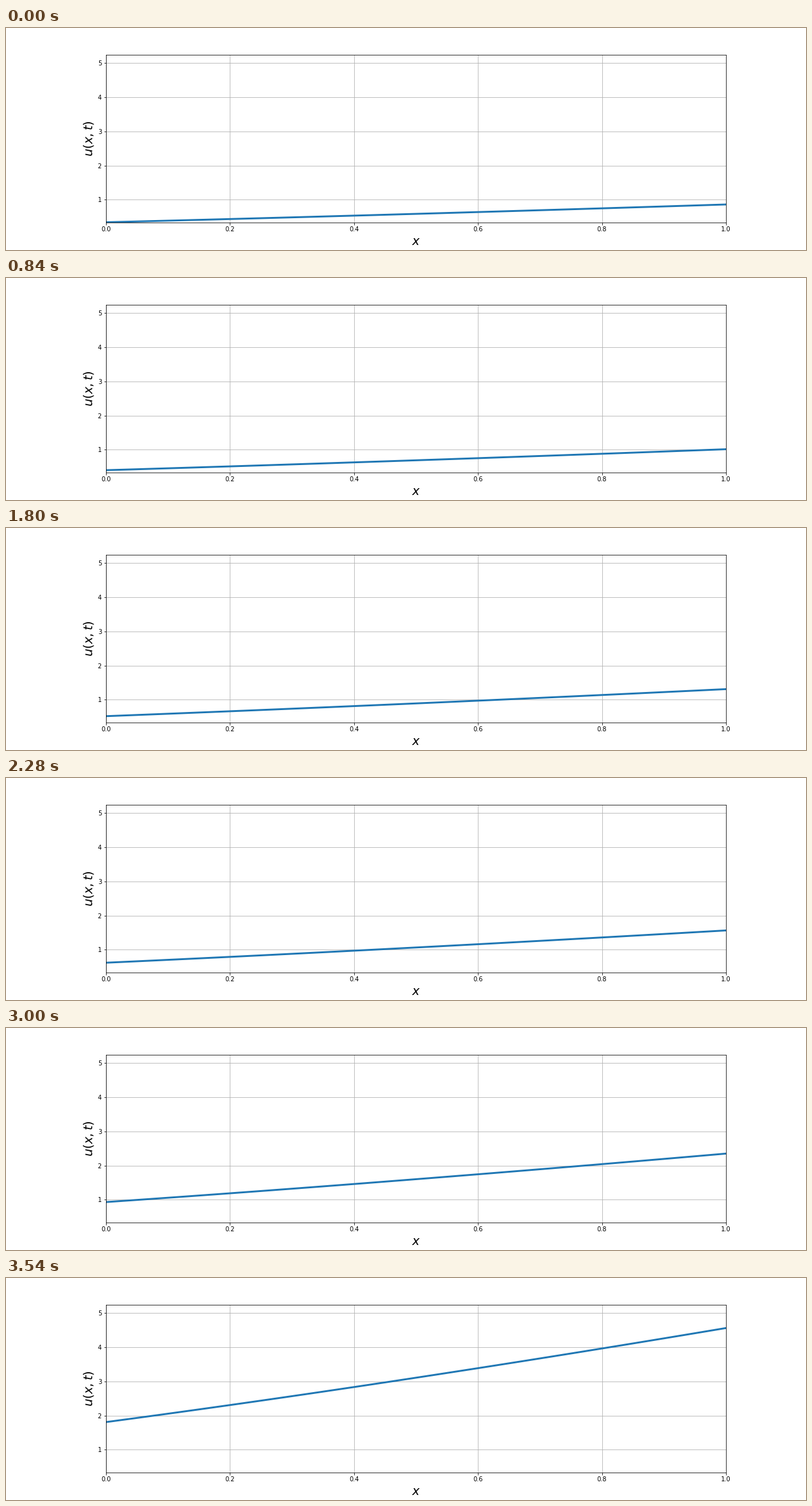
Animation, 1280 px wide and 356 px high, one loop 3600 ms. Source, as a matplotlib script:

```python
import numpy as np
import matplotlib.pyplot as plt
from matplotlib.animation import FuncAnimation

W, H, DPI = 1280, 356, 72
FRAMES, INTERVAL = 60, 60
SCALE = W / (18 * DPI)  # the layout is designed for an 18 inch wide figure

plt.rcParams.update({
    "font.family": "DejaVu Sans",
    "font.size": 10 * SCALE,
    "mathtext.fontset": "dejavusans",
})


def u(x, t):
    """Blow-up solution of u_t = (u^1.5 u_x)_x, singular at t = 15/14."""
    return ((1 + x) ** 2 / (5 - 14 * t / 3)) ** (2 / 3)


x = np.linspace(0, 1, 101)

fig, ax = plt.subplots(figsize=(W / DPI, H / DPI), dpi=DPI, facecolor="white")
fig.subplots_adjust(left=0.125, right=0.9, bottom=0.125, top=0.88)

ax.set_xlim(0, 1)
ax.set_ylim(u(0, 0), u(1, 1))
ax.set_xticks(np.linspace(0, 1, 6))
ax.set_yticks(range(1, 6))
ax.set_xlabel("$x$", fontsize=20 * SCALE)
ax.set_ylabel("$u(x,t)$", fontsize=20 * SCALE)
ax.grid(True)

line, = ax.plot(x, u(x, 0), color="#1f77b4", lw=3 * SCALE)


def update(i):
    line.set_ydata(u(x, i / FRAMES))
    return line,


anim = FuncAnimation(fig, update, frames=FRAMES, interval=INTERVAL,
                     repeat=True, repeat_delay=0)
plt.show()
```
